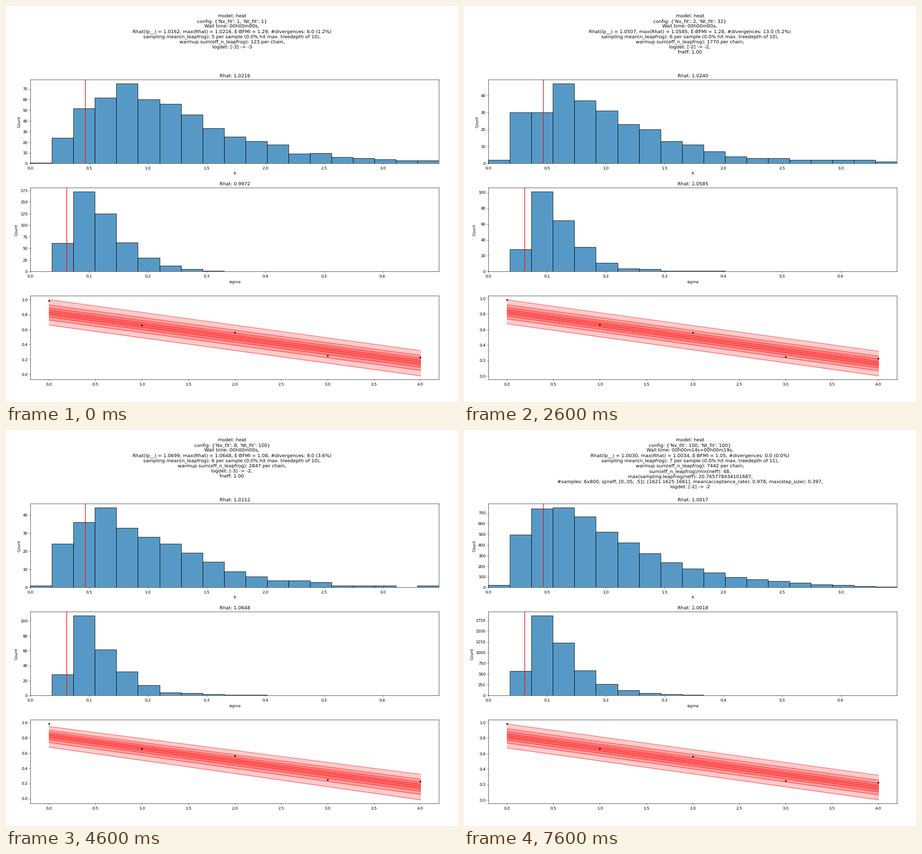
These frames come from a looping animation (800 px wide and 700 px high, 8.1 s). A matplotlib script:

```python
import numpy as np
import matplotlib.pyplot as plt
from matplotlib.animation import FuncAnimation

plt.rcParams["text.hinting"] = "none"

W, H, DPI = 800, 700, 50
BINS = 19
K_MAX, S_MAX = 3.478, 0.696
K_TRUE, S_TRUE = 0.466, 0.0611
RUNS = 17
LONG = RUNS - 2          # the last two runs draw far more samples
T = np.arange(5)
OBS = [0.986, 0.662, 0.564, 0.25, 0.226]
# spread of the evenly spaced quantiles, relative to the outermost pair
SPREAD = [1.0, 0.598, 0.363, 0.174]
BLUE = (31 / 255, 119 / 255, 180 / 255, 0.75)

NX = [2 ** max(0, i) for i in (0, 0, 0, 0, 0, 0, 1, 2, 2, 3, 3, 4, 5, 6)] + [100] * 3
NT = [1, 2, 4, 8, 16, 32, 32, 32, 64, 64] + [100] * 7

# key runs; the runs between them are interpolated
KEY = [0, 4, 7, 10, 12, 14, 16]
TRACKS = dict(
    rhat_k=[1.0216, 1.0013, 1.0354, 1.0112, 0.9858, 1.0131, 1.0017],
    rhat_s=[0.9972, 1.0288, 1.0733, 1.0648, 1.0009, 1.0244, 1.0018],
    worst=[1.0216, 1.0288, 1.0733, 1.0648, 1.0009, 1.0244, 1.0034],
    rhat_lp=[1.0162, 1.07, 1.0411, 1.0699, 1.0221, 1.0327, 1.003],
    bfmi=[1.29, 1.12, 1.36, 1.08, 1.32, 1.15, 1.05],
    div=[6, 14, 12, 9, 9, 9, 0],
    warm=[123, 1270, 2020, 2847, 3324, 3853, 7442],
    det0=[-3, -3, -2, -3, -3, -2, -2],
    det1=[-3, -2, -2, -2, -3, -3, -2],
    k_peak=[0.149, 0.163, 0.198, 0.175, 0.147, 0.171, 0.1563],
    s_peak=[0.341, 0.385, 0.409, 0.425, 0.429, 0.425, 0.3875],
    top=[1.003, 0.993, 0.978, 0.948, 0.993, 0.968, 0.982],
    low=[0.662, 0.647, 0.687, 0.677, 0.712, 0.7, 0.672],
    low_end=[-0.019, -0.007, 0.006, -0.015, 0.025, 0.025, 0.003],
)


def total(n):
    return 4800 if n >= LONG else 252 if n else 504


def counts(rng, size, peak, power, rate, cut):
    """Noisy histogram of x^power * exp(-rate x - cut / x)."""
    x = np.arange(BINS) + 0.5
    mean = x ** power * np.exp(-rate * x - cut / x)
    mean *= size / mean.sum()
    noisy = mean + 0.5 * np.sqrt(mean) * rng.normal(size=BINS)
    tallest = round(peak * size)
    out = np.clip(np.rint(noisy), 0, tallest)
    out[mean.argmax()] = tallest
    return out


def run(n):
    rng = np.random.default_rng(n)
    r = {name: np.interp(n, KEY, track) for name, track in TRACKS.items()}
    r["k"] = counts(rng, total(n), r["k_peak"], 0.3 + 0.6 * np.exp(-n), 0.345, 2.2)
    r["s"] = counts(rng, total(n), r["s_peak"], -7.9, 0, 19.5)
    return r


def heading(n, r):
    long = n >= LONG
    wall = "00h00m14s+00h00m19s" if n == RUNS - 1 else \
        "00h00m14s+00h00m13s" if long else f"00h00m0{n // 14}s"
    div = round(r["div"])
    leap = 7 if long else 6 if n else 5
    rows = [
        "model: heat",
        f"config: {{'Nx_fit': {NX[n]}, 'Nt_fit': {NT[n]}}}",
        f"Wall time: {wall},",
        f"Rhat(lp__) = {r['rhat_lp']:.4f}, max(Rhat) = {r['worst']:.4f}, "
        f"E-BFMI = {r['bfmi']:.2f}, #divergences: {div:.1f} "
        f"({100 * div / total(n):.1f}%)",
        f"sampling mean(n_leapfrog): {leap} per sample "
        f"(0.0% hit max. treedepth of {11 if long else 10}),",
        f"warmup sum(eff_n_leapfrog): {r['warm']:.0f} per chain,",
    ]
    if long:
        rows += [
            "sum(eff_n_leapfrog)/min(neff): 48,",
            "max(sampling leapfrog/neff): 20.765778434101687,",
            "#samples: 6x800, q(neff, [0,.05, .5]): [1621 1625 1661], "
            "mean(acceptance_rate): 0.978, max(step_size): 0.397,",
        ]
    end = f"logdet: [{r['det0']:.0f}] -> {r['det1']:.0f}"
    rows += [end] if long or n == 0 else [end + ",", "fneff: 1.00"]
    return "\n".join(rows)


fig = plt.figure(figsize=(W / DPI, H / DPI), dpi=DPI)
title = fig.suptitle("", y=0.98, fontsize=12)


def panel(top):
    return fig.add_axes([43.2 / W, 1 - (top + 148.2) / H, 723.1 / W, 148.2 / H])


ax_k, ax_s, ax_y = (panel(130.2 + 191 * i) for i in range(3))


def histogram(ax, heights, xmax, true, label, rhat):
    ax.cla()
    step = xmax / BINS
    ax.bar(np.arange(BINS) * step, heights, step, align="edge",
           facecolor=BLUE, edgecolor="k", linewidth=1)
    ax.axvline(true, color="r")
    ax.set_xlim(0, xmax)
    ax.set_ylim(0, heights.max() * 1.05)
    ax.set_xlabel(label)
    ax.set_ylabel("Count")
    ax.set_title(f"Rhat: {rhat:.4f}", fontsize=12)


def bands(ax, r):
    ax.cla()
    high = np.linspace(r["top"], 0.32, 5)
    low = np.linspace(r["low"], r["low_end"], 5)
    mid = np.linspace(0.829, 0.163, 5)
    for z in SPREAD:
        up, down = mid + z * (high - mid), mid + z * (low - mid)
        ax.fill_between(T, down, up, color="r", alpha=0.2)
        ax.plot(T, up, "r", T, down, "r", alpha=0.5)
    ax.plot(T, mid, "r", alpha=0.5)
    ax.plot(T, OBS, "k.")


def draw(frame):
    n = (frame + 4) // 5    # the first run shows for one tick, the rest for five
    r = run(n)
    title.set_text(heading(n, r))
    histogram(ax_k, r["k"], K_MAX, K_TRUE, "K", r["rhat_k"])
    histogram(ax_s, r["s"], S_MAX, S_TRUE, "sigma", r["rhat_s"])
    bands(ax_y, r)


anim = FuncAnimation(fig, draw, frames=81, interval=100, repeat=True,
                     repeat_delay=0, blit=False)
plt.show()
```
